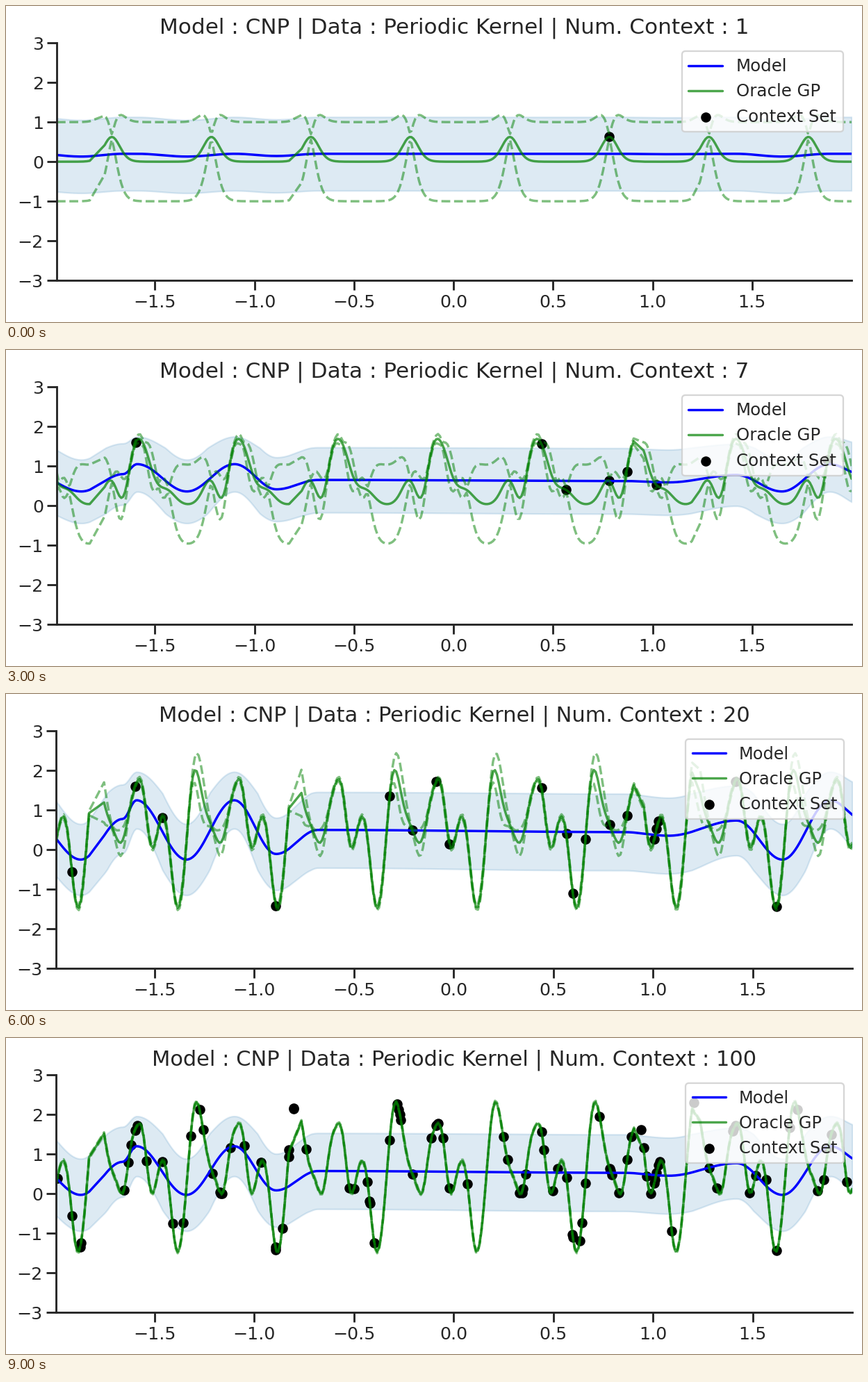
Write a matplotlib script that moves like this. It is 1232 by 455 pixels and loops after 10000 ms.

```python
import numpy as np
import matplotlib.pyplot as plt
from matplotlib.animation import FuncAnimation

WIDTH, HEIGHT, DPI = 1232, 455, 110
INK = "0.15"
PERIOD, LENGTH, NOISE = 0.5, 0.5, 5e-3
X_MIN, X_MAX = -1.994, 2.0

plt.rcParams.update({
    "font.family": "DejaVu Sans", "text.color": INK, "axes.edgecolor": INK,
    "axes.linewidth": 1.875, "lines.linewidth": 2.25, "patch.linewidth": 1.5,
    "lines.solid_capstyle": "round", "xtick.color": INK, "ytick.color": INK,
    "xtick.labelsize": 16.5, "ytick.labelsize": 16.5, "xtick.major.pad": 4,
    "xtick.major.size": 9, "ytick.major.size": 9,
    "xtick.major.width": 1.875, "ytick.major.width": 1.875,
})

# Context size: model level in troughs, on peaks, in the middle; band half width
STAGES = {
    1: (.13, .20, .20, .93),
    3: (.25, .50, .40, .87),
    5: (.42, .87, .55, .82),
    7: (.36, 1.05, .63, .83),
    10: (-.24, 1.37, .48, .95),
    15: (-.38, 1.40, .43, .96),
    20: (-.25, 1.25, .46, .97),
    30: (-.08, 1.10, .49, .99),
    50: (-.08, 1.15, .52, .98),
    100: (-.03, 1.20, .54, .97),
}
COUNTS = list(STAGES)

# Turning points of the model: x, position from trough (-1) over middle to peak (1)
TURNS = [(-2.1, .3), (-1.87, -1), (-1.66, .4), (-1.59, 1), (-1.34, -1),
         (-1.1, 1), (-.89, -.8), (-.68, .05), (.85, -.02), (1.08, -.15),
         (1.42, .35), (1.65, -1), (1.89, 1), (2.05, .4)]

# Observations in the order in which they are revealed
OBSERVED = np.array([
    (.783, .63), (.566, .4), (.871, .87), (.442, 1.57), (1.879, 1.17),
    (-1.597, 1.6), (1.018, .53), (1.007, .27), (1.028, .72), (1.62, -1.43),
    (-1.914, -.56), (-.206, .49), (-.021, .14), (.599, -1.1), (1.416, 1.73),
    (-1.461, .81), (-.893, -1.42), (-.321, 1.35), (-.088, 1.72), (.662, .27),
    (-1.869, -1.25), (-1.256, 1.62), (-1.161, 0), (-.966, .8), (-.524, .14),
    (-.419, -.25), (-.269, 2), (-.053, 1.41), (.362, .5), (1.972, .31)])

# Stretches without any evaluation input, bridged by straight lines
GAPS = [(-1.828, -1.753), (-.826, -.763), (.905, .955), (1.197, 1.237)]


def kernel(a, b):
    sine = np.sin(np.pi * (a[:, None] - b[None, :]) / PERIOD)
    return np.exp(-2 * (sine / LENGTH) ** 2)


def gp(x, y, x_new, noise=NOISE):
    gram = kernel(x, x) + noise * np.eye(len(x))
    cross = kernel(x_new, x)
    mean = cross @ np.linalg.solve(gram, y)
    var = 1 - np.sum(cross * np.linalg.solve(gram, cross.T).T, axis=1)
    return mean, np.sqrt(np.maximum(var, 1e-6))


def ease(x, xs, ys):
    """Join the points (xs, ys) by half cosine waves."""
    step = np.interp(x, xs, np.arange(len(xs)))
    i = np.minimum(step.astype(int), len(xs) - 2)
    t = (1 - np.cos(np.pi * (step - i))) / 2
    return ys[i] + (ys[i + 1] - ys[i]) * t


def model(count):
    low, high, middle, width = STAGES[count]
    xs, position = np.array(TURNS).T
    reach = np.where(position > 0, high - middle, middle - low)
    mean = ease(X, xs, middle + position * reach)
    above, below = np.maximum(mean - middle, 0), np.maximum(middle - mean, 0)
    return mean, width - .32 * above - .1 * below


X = np.linspace(X_MIN, X_MAX, 420)
X = X[~np.any([(X > a) & (X < b) for a, b in GAPS], axis=0)]
X = np.sort(np.append(X, np.ravel(GAPS)))

rng = np.random.default_rng(3)
extra = rng.uniform(X_MIN, X_MAX, COUNTS[-1] - len(OBSERVED))
CONTEXT_X = np.append(OBSERVED[:, 0], extra)
CONTEXT_Y = np.append(OBSERVED[:, 1], gp(*OBSERVED.T, extra, noise=5e-4)[0])

fig = plt.figure(figsize=(WIDTH / DPI, HEIGHT / DPI), dpi=DPI)
ax = fig.add_subplot()


def draw(index):
    count = COUNTS[index]
    two_digits = count >= 10
    left, right = (72, 1218) if two_digits else (73, 1217)
    text_scale = 1 if two_digits else 1.02

    ax.clear()
    ax.set_position([left / WIDTH, 1 - 395.2 / HEIGHT,
                     (right - left) / WIDTH, 342 / HEIGHT])

    mean, half = model(count)
    ax.plot(X, mean, color="blue", label="Model")
    ax.fill_between(X, mean - half, mean + half, color="tab:blue", alpha=.15)

    x, y = CONTEXT_X[:count], CONTEXT_Y[:count]
    mean, std = gp(x, y, X)
    ax.plot(X, mean, color="green", alpha=.7, label="Oracle GP")
    for side in (-1, 1):
        ax.plot(X, mean + side * std, "--", color="green", alpha=.5)
    ax.scatter(x, y, s=64, color="black", linewidths=1.5, label="Context Set")

    ax.set(xlim=(X_MIN, X_MAX), ylim=(-3, 3),
           xticks=np.arange(-1.5, 1.6, .5), yticks=range(-3, 4))
    ax.spines[["top", "right"]].set_visible(False)
    ax.set_title(f"Model : CNP | Data : Periodic Kernel | Num. Context : {count}",
                 fontsize=20 * text_scale, pad=9)
    ax.legend(loc="upper right", fontsize=15.7 * text_scale)


anim = FuncAnimation(fig, draw, frames=len(COUNTS), init_func=lambda: None,
                     interval=1000, repeat=True, repeat_delay=0)
plt.show()
```
